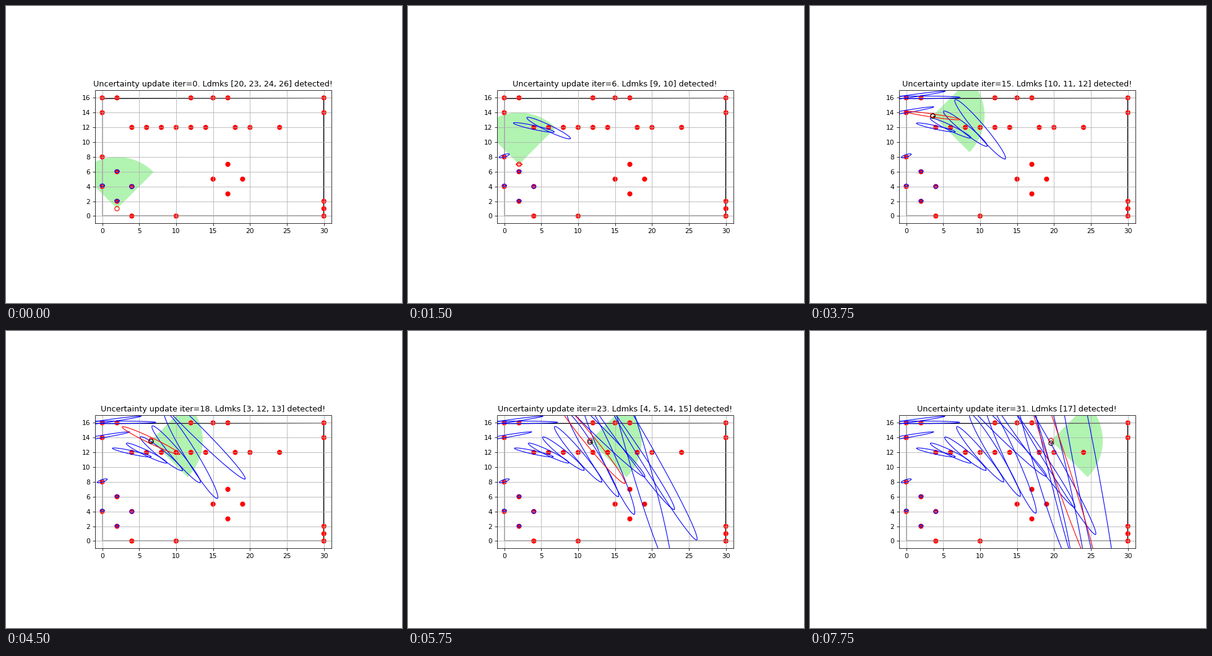
Animation, 640 px wide and 480 px high, one loop 8000 ms. Source, as a matplotlib script:

```python
import numpy as np
import matplotlib.pyplot as plt
from matplotlib.animation import FuncAnimation
from matplotlib.patches import Circle, Wedge

DPI = 72
STEPS = 32
VIEW_RANGE = 7
TURN_RADIUS = 1.6
START_X = 2
EPS = 1e-6

# Landmarks are numbered from 1, row by row from the top.
ROWS = {
    16: [0, 2, 12, 15, 17, 30],
    14: [0, 30],
    12: [*range(4, 15, 2), 18, 20, 24],
    8: [0],
    7: [17],
    6: [2],
    5: [15, 19],
    4: [0, 4],
    3: [17],
    2: [2, 30],
    1: [30],
    0: [4, 10, 30],
}
LANDMARKS = {k: (x, y) for k, (x, y) in enumerate(
    ((x, y) for y, xs in ROWS.items() for x in xs), 1)}


def pose(i):
    """Position and heading in degrees: up, a quarter turn, then right."""
    if i <= 11:
        return START_X, 1 + i, 90
    turn = min((i - 11) / 4, 1) * np.pi / 2
    x = START_X + TURN_RADIUS * (1 - np.cos(turn)) + max(i - 15, 0)
    return x, 12 + TURN_RADIUS * np.sin(turn), 90 - np.degrees(turn)


def detected(i):
    x, y, heading = pose(i)
    found = []
    for k, (lx, ly) in LANDMARKS.items():
        dist = np.hypot(lx - x, ly - y)
        bearing = np.degrees(np.arctan2(ly - y, lx - x)) - heading
        bearing = (bearing + 180) % 360 - 180
        if EPS < dist <= VIEW_RANGE + EPS and abs(bearing) <= 45 + EPS:
            found.append(k)
    return found


SEEN = [detected(i) for i in range(STEPS)]
FIRST_SEEN = {}
for step, ids in enumerate(SEEN):
    for k in ids:
        FIRST_SEEN.setdefault(k, step)


def major_axis(x, y):
    """Heading error swings a point about a pivot that climbs with distance."""
    keys = [2, 8, 14, 20, 24]
    spread = np.interp(x, keys, [0.26, 0.4, 0.7, 1.12, 1.2]) + 0.035 * (y - 12)
    pivot_y = np.interp(x, keys, [2, 4.5, 6.6, 7.8, 7.8])
    spread = max(spread, 0)
    return np.array([y - pivot_y, START_X - x]) * spread


def ellipse(center, major, minor):
    t = np.linspace(0, 2 * np.pi, 181)
    dx, dy = major
    length = np.hypot(dx, dy) or 1
    nx, ny = -dy / length * minor, dx / length * minor
    return (center[0] + dx * np.cos(t) + nx * np.sin(t),
            center[1] + dy * np.cos(t) + ny * np.sin(t))


def landmark_ellipse(k, age):
    """Uncertainty of a landmark, shrinking after it is first seen."""
    x, y = LANDMARKS[k]
    fade = np.exp(-age / 3)
    major = major_axis(x, y)
    if np.hypot(*major) < 0.3:
        major = np.array([0.3, 0])
    minor = max(0.2, 0.07 * x) * (0.85 + 0.15 * fade)
    center = x, y + max(0.15 - 0.04 * x, -0.4)
    return ellipse(center, major * (0.93 + 0.07 * fade), minor)


def pose_ellipse(i):
    x, y, _ = pose(i)
    major = major_axis(x, y) * 0.95
    return ellipse((x, y), major, min(0.06 * x, np.hypot(*major)))


plt.rcParams["font.size"] = 10.67
fig = plt.figure(figsize=(640 / DPI, 480 / DPI), dpi=DPI, facecolor="white")
ax = fig.add_axes([143.6 / 640, 128.6 / 480, 382.1 / 640, 214.9 / 480])
ax.set_xlim(-1, 31)
ax.set_ylim(-1, 17)
ax.set_xticks(range(0, 31, 5))
ax.set_yticks(range(0, 17, 2))
ax.tick_params(length=3.7, pad=3.7)
ax.grid(True)
title = ax.set_title("", pad=6.6)

fov = ax.add_patch(Wedge((0, 0), VIEW_RANGE, 0, 90, fc="lightgreen",
                         ec="none", alpha=0.7, zorder=0.5))
for xs, ys, color, width in [
    ([0.04, 0.04], [0, 16], "#b0b0b0", 2),
    ([0, 30], [0.02, 0.02], "#b0b0b0", 2),
    ([0, 30], [15.9, 15.98], "black", 1.2),
    ([29.97, 29.97], [0, 16], "black", 1.4),
]:
    ax.plot(xs, ys, color=color, lw=width, zorder=0.9)
for spot in LANDMARKS.values():
    ax.add_patch(Circle(spot, 0.3, fc="red", ec="red", lw=1, zorder=1))

blue = {k: ax.plot([], [], color="blue", lw=1.1)[0] for k in FIRST_SEEN}
red_line, = ax.plot([], [], color="red", lw=1.1)
red_robot = ax.add_patch(Circle((0, 0), 0.3, fill=False, ec="red", lw=1.2, zorder=3))
true_robot = ax.add_patch(Circle((0, 0), 0.3, fill=False, ec="black", lw=1.1, zorder=4))
nose, = ax.plot([], [], color="black", lw=1, zorder=4)


def draw(i):
    x, y, heading = pose(i)
    title.set_text(f"Uncertainty update iter={i}. Ldmks {SEEN[i]} detected!")
    fov.set_center((x, y))
    fov.set_theta1(heading - 45)
    fov.set_theta2(heading + 45)

    for k, line in blue.items():
        age = i - FIRST_SEEN[k]
        line.set_visible(age >= 0)
        if age >= 0:
            line.set_data(*landmark_ellipse(k, age))

    red_line.set_data(*pose_ellipse(i))
    red_robot.set_center((x, y))
    true_y = y - 0.018 * max(i - 11, 0)
    true_robot.set_center((x, true_y))
    angle = np.radians(heading)
    nose.set_data([x, x + 0.3 * np.cos(angle)],
                  [true_y, true_y + 0.3 * np.sin(angle)])
    for part in (true_robot, nose):
        part.set_visible(i > 11)
    return [title, fov, *blue.values(), red_line, red_robot, true_robot, nose]


anim = FuncAnimation(fig, draw, frames=STEPS, interval=250, repeat=True,
                     repeat_delay=0, blit=False)
plt.show()
```
